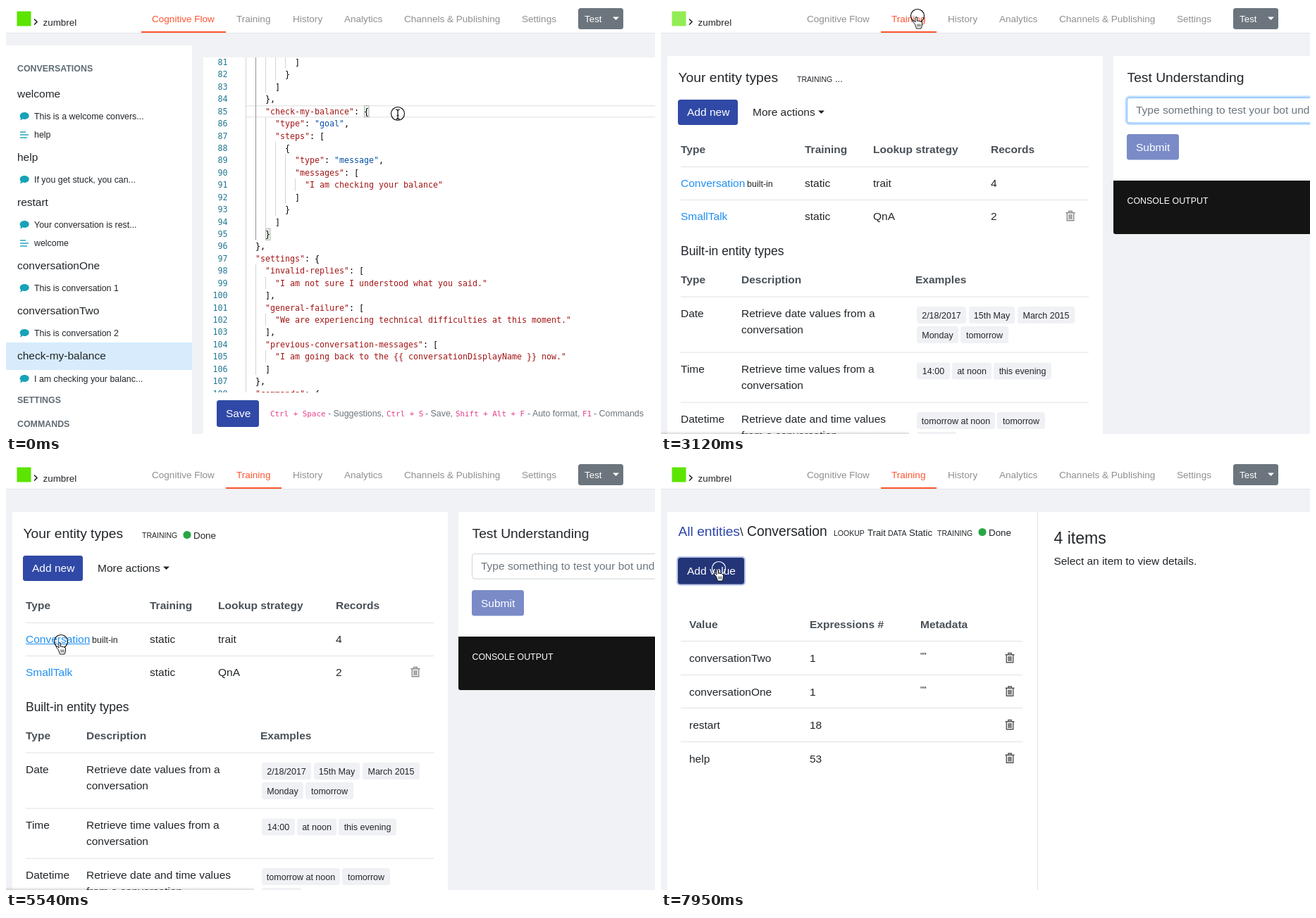
Animation of 921x608 px, one loop 8000 ms. Source, as an HTML page:

```html
<!DOCTYPE html>
<html lang="en">
<head>
<meta charset="utf-8">
<title>Bot console</title>
<style>
html, body { margin: 0; width: 100%; height: 100%; overflow: hidden; background: #f1f2f5; }
svg { display: block; width: 100vw; height: 100vh; }
text { font-family: "Liberation Sans", Arial, sans-serif; white-space: pre; }
.mono { font-family: "DejaVu Sans Mono", monospace; }
.b { font-weight: 700; }
</style>
</head>
<body>
<svg id="stage" viewBox="0 0 921 608"></svg>
<script>
const INK = '#212529', HEAD = '#495057', GRAY = '#6c757d', BLUE = '#3049a6',
      ORANGE = '#ff5430', TEAL = '#17a2b8', LINE = '#dee2e6', NAV = '#8f8f8f';

// Drawing helpers
const T = (x, y, s, size = 15.5, fill = INK, attr = '') =>
  `<text x="${x}" y="${y}" font-size="${size}" fill="${fill}" ${attr}>${s}</text>`;
const B = (x, y, s, size = 15.5, fill = HEAD) => T(x, y, s, size, fill, 'class="b"');
const R = (x, y, w, h, fill, r = 0, attr = '') =>
  `<rect x="${x}" y="${y}" width="${w}" height="${h}" rx="${r}" fill="${fill}" ${attr}/>`;
const G = (id, body, attr = '') => `<g id="${id}" ${attr}>${body}</g>`;
const rule = (x, y, w) => R(x, y, w, 1, LINE);
const button = (x, y, w, h, label, fill = BLUE, id = '') =>
  R(x, y, w, h, fill, 3.5, id && `id="${id}"`) + T(x + 13, y + h / 2 + 5.3, label, 15.5, '#fff');
const down = (x, y, fill) => `<path d="M${x} ${y}h9l-4.5 4.5z" fill="${fill}"/>`;
const trash = (x, y, fill) =>
  `<g transform="translate(${x} ${y})" fill="none" stroke="${fill}" stroke-width="1.4">
   <path d="M-6.5 -4.7H6.5M-2.2 -5.2V-7H2.2V-5.2M-4.7 -4V6.3H4.7V-4M-1.9 -2.5V4.5M0 -2.5V4.5M1.9 -2.5V4.5"/></g>`;

// Header bar
function header() {
  const items = [[327, 'Training', 'navTrain'], [207, 'Cognitive Flow', 'navFlow'], [407, 'History'],
    [480, 'Analytics'], [565, 'Channels &amp; Publishing'], [732, 'Settings']];
  return R(0, 0, 921, 38, '#fff') + R(0, 38, 921, 1, '#e3e5e8') +
    R(15.5, 7.5, 20, 21, '#5ce500', 0, 'id="logo"') +
    '<path d="M40 18.500l4 4l-4 4" fill="none" stroke="#222" stroke-width="1.6"/>' +
    T(52.5, 28, 'zumbrel', 13.4) +
    items.map(([x, s, id]) => T(x, 23.3, s, 13.55, NAV, id ? `id="${id}"` : '')).join('') +
    R(192, 36, 120, 2, ORANGE, 0, 'id="underline"') +
    R(812, 3, 64, 30, GRAY, 3.5) + T(821, 23.3, 'Test', 13.4, '#fff') + down(861, 15.5, '#fff');
}

// Flow page
function sidebar() {
  const chat = y => `<path d="M26 ${y - 5.5}c9 0 9 10 0 10q-1.500 0 -2.500 -.4q-1.500 1.600 -4 1.600q1.500 -1.300 1.600 -2.800c-3.400 -3.400 -.5 -8.400 4.900 -8.400z" fill="${TEAL}"/>`;
  const list = y => [[-4, 8], [0, 12], [4, 10]].map(([d, w]) => R(20, y + d - .7, w, 1.4, TEAL)).join('');
  const heads = [[125, 'welcome'], [215, 'help'], [279, 'restart'], [369, 'conversationOne'],
    [433, 'conversationTwo'], [497, 'check-my-balance']];
  const chats = [[156.5, 'This is a welcome convers...'], [246.5, 'If you get stuck, you can...'],
    [310.5, 'Your conversation is rest...'], [400.5, 'This is conversation 1'],
    [464.5, 'This is conversation 2'], [529.5, 'I am checking your balanc...']];
  return R(0, 56, 264, 552, '#fff') + R(0, 478, 264, 39, '#d7ebfc') +
    [[93, 'CONVERSATIONS'], [563.5, 'SETTINGS'], [597.500, 'COMMANDS']].map(([y, s]) => B(16, y, s, 12.4, '#5f6b75')).join('') +
    heads.map(([y, s]) => T(16, y + 5, s)).join('') +
    chats.map(([y, s]) => chat(y) + T(40, y + 4.5, s, 12.4)).join('') +
    [[183, 'help'], [337, 'welcome']].map(([y, s]) => list(y) + T(40, y + 4.3, s, 12.4)).join('');
}

const CODE = `          ]
        }
      ]
    },
    "check-my-balance": {
      "type": "goal",
      "steps": [
        {
          "type": "message",
          "messages": [
            "I am checking your balance"
          ]
        }
      ]
    }
  },
  "settings": {
    "invalid-replies": [
      "I am not sure I understood what you said."
    ],
    "general-failure": [
      "We are experiencing technical difficulties at this moment."
    ],
    "previous-conversation-messages": [
      "I am going back to the {{ conversationDisplayName }} now."
    ]
  },
  "commands": {`.split('\n');

function editor() {
  const left = 340, col = 7.008, row = 17.43;
  const paint = s => s.replace(/(: )?("[^"]*")/g, (m, colon = '', str) =>
    `${colon}<tspan fill="${colon ? '#0451a5' : '#a31515'}">${str}</tspan>`);
  const match = (x, y) => R(x, y, 6.5, 16.5, '#e6efe6', 0, 'stroke="#b9b9b9"');
  let out = R(341, 141, 580, 1.500, '#e9e9e9') + R(341, 157, 580, 1.500, '#e9e9e9') +
    match(508.5, 141.5) + match(368.5, 316);
  CODE.forEach((text, i) => {
    const indent = text.search(/\S/), y = 84 + i * row;
    for (let c = 0; c < indent; c += 2)
      out += R(left + Math.round(c * col), y - 13, 1, row + .1, c === 2 && i < 15 ? '#939393' : '#d3d3d3');
    out += T(314.6, y, 81 + i, 11.64, '#237893', 'class="mono" text-anchor="end"') +
      T(left + indent * col, y, paint(text.trim()), 11.64, '#000', 'class="mono"');
  });
  const keys = [[375, 'Ctrl + Space', 457, 'Suggestions,'], [540, 'Ctrl + S', 595, 'Save,'],
    [638, 'Shift + Alt + F', 740, 'Auto format,'], [818, 'F1', 834, 'Commands']];
  return R(280, 73, 641, 535, '#fff') +
    `<clipPath id="view"><rect x="280" y="73" width="641" height="476"/></clipPath><g clip-path="url(#view)">${out}</g>` +
    R(514, 141, 2, 18, '#000', 0, 'id="codeCaret"') +
    button(299, 560, 60, 38, 'Save') +
    keys.map(([x, k, x2, s]) => T(x, 583, k, 10.86, '#e83e8c', 'class="mono"') + T(x2, 583, '- ' + s, 12.4, GRAY)).join('');
}

// Training page
const done = (x, y) => `<circle cx="${x}" cy="${y - 5}" r="5.600" fill="#28a745"/>` + T(x + 9, y, 'Done', 13.4);
const columns = (y, xs, names) => names.map((s, i) => B(xs[i], y, s)).join('');
const chips = (y, list) => list.map(([x, w, s]) =>
  R(x, y - 12, w, 24, '#f0f1f4', 3.5) + T(x + w / 2, y + 4.6, s, 12.5, INK, 'text-anchor="middle"')).join('');

function builtIns() {
  const rows = [[371, 'Date', 'Retrieve date values from a', 'conversation'],
    [450, 'Time', 'Retrieve time values from a', 'conversation'],
    [521, 'Datetime', 'Retrieve date and time values', 'from a conversation'],
    [600, 'Number', 'Retrieve numeric from a', 'conversation']];
  return T(28, 283.500, 'Built-in entity types', 17.45) +
    columns(323.5, [28, 114, 361], ['Type', 'Description', 'Examples']) +
    [342, 421, 492, 571].map(y => rule(28, y, 579)).join('') +
    rows.map(([y, a, b, c]) => T(28, y, a) + T(114, y, b) + T(114, y + 23.2, c)).join('') +
    chips(368.5, [[363, 70, '2/18/2017'], [437, 65, '15th May'], [506, 81, 'March 2015']]) +
    chips(396.5, [[363, 59, 'Monday'], [425, 68, 'tomorrow']]) +
    chips(448, [[363, 47, '14:00'], [413, 56, 'at noon'], [472, 82, 'this evening']]) +
    chips(518.5, [[363, 111, 'tomorrow at noon'], [477, 68, 'tomorrow']]) +
    chips(546.5, [[363, 56, 'at noon']]) +
    chips(598, [[363, 29, '10'], [395, 35, 'five']]);
}

function training() {
  const heads = ['Type', 'Training', 'Lookup strategy', 'Records'], xs = [28, 204, 301, 468];
  const cells = (y, vals) => vals.map((s, i) => T(xs[i + 1], y, s)).join('');
  return R(9, 71, 618, 540, '#fff', 2) + T(24.5, 108, 'Your entity types', 19.25) +
    T(193, 108, 'TRAINING', 10.5) + G('dots', T(247, 108, '...', 13)) + G('done', done(257, 108.5)) +
    button(24, 133, 85, 36, 'Add new') + T(130, 156.3, 'More actions') + down(223, 148.5, INK) +
    rule(28, 228, 579) +
    G('loading', columns(209, [28, 110, 235, 450], heads) + T(28, 260.500, 'Loading entities...')) +
    G('loaded', columns(209, xs, heads) + rule(28, 275, 579) +
      T(28, 256.800, 'Conversation', 15.5, '#1e8ff0') + R(28, 258, 91, 1, '#1e8ff0', 0, 'id="linkLine"') +
      T(122, 256.800, 'built-in', 12.5) + cells(256.800, ['static', 'trait', '4']) +
      T(28, 304, 'SmallTalk', 15.5, '#1e8ff0') + cells(304, ['static', 'QnA', '2']) + trash(581, 298.5, '#8a8a8a')) +
    G('lower', builtIns()) +
    R(642, 71, 290, 180, '#fff', 2) + T(661.500, 108, 'Test Understanding', 19.25) +
    R(661.5, 130.500, 300, 35.500, '#fff', 3.5, 'stroke="#ced4da"') +
    G('glow', R(660, 129, 303, 38.500, 'none', 5, 'stroke="#bfdeff" stroke-width="3"') +
      R(661.5, 130.500, 300, 35.500, '#fff', 3.5, 'stroke="#80bdff"')) +
    T(674, 153, 'Type something to test your bot understanding', 15.5, GRAY) +
    R(674, 139, 1, 18, '#000', 0, 'id="inputCaret"') +
    button(661, 182, 74, 36.500, 'Submit', '#7a8bc8') +
    R(642, 248, 290, 76, '#141414', 3) + R(642, 248, 290, 8, '#141414') +
    T(661.500, 281, 'CONSOLE OUTPUT', 12.4, '#fff');
}

// Entity page
function entity() {
  const rows = [['conversationTwo', '1', 1], ['conversationOne', '1', 1], ['restart', '18'], ['help', '53']];
  const label = (x, s) => T(x, 104.5, s, 10.5);
  return R(9, 71, 912, 540, '#fff') + R(534, 71, 1, 537, '#e3e5e8') +
    T(24.5, 104.5, 'All entities', 19.2, '#2c45a8') + T(112, 104.5, '\\', 17) + T(122, 104.5, 'Conversation', 19.3) +
    label(245, 'LOOKUP') + T(293, 104.5, 'Trait', 13.2) + label(322, 'DATA') + T(352, 104.5, 'Static', 13.2) +
    label(392, 'TRAINING') + done(456, 104.5) +
    R(22, 134, 98, 41.500, '#b9c3e6', 5, 'id="ring"') + button(24, 136, 94, 37.500, 'Add value', BLUE, 'addValue') +
    columns(236.300, [40, 211, 368], ['Value', 'Expressions #', 'Metadata']) +
    rows.map(([a, n, meta], i) => {
      const y = 284 + i * 47.5;
      return rule(28, Math.round(y - 30), 485) + T(40, y, a) + T(211, y, n) +
        (meta ? T(368, y - 4, '""', 12) : '') + trash(495, y - 5.5, '#555');
    }).join('') +
    T(557.500, 116.300, '4 items', 23) + T(557.500, 146.300, 'Select an item to view details.', 15.4);
}

const pointer = `<circle id="halo" r="9.500" fill="none" stroke="#111" stroke-width="1.2"/>` +
  G('beam', '<path d="M-3 -6q3 0 3 2q0 -2 3 -2M0 -4V6M-3 8q3 0 3 -2q0 2 3 2M-1.500 2.500h3" fill="none" stroke="#000" stroke-width="1.2"/>') +
  G('arrow', '<path d="M-2 1V13.500L1 11L3.200 15.800L5.400 14.800L3.300 10.200H7.200Z" fill="#000" stroke="#fff" stroke-width=".8"/>') +
  G('hand', `<path d="M-3.500 12L-6.500 8.500Q-7 6.500 -5 7L-3 9V3Q-3 1.500 -1.800 1.500Q-.5 1.500 -.5 3V7.300Q1 6.300 2 7.700Q3.500 6.800 4.500 8.300Q6.500 8 6.500 10V13Q6.500 15 5 18H-1.500Z" fill="#fff" stroke="#111"/>
    <path d="M0 11.500v4M2 11.500v4M4 11.500v4" stroke="#111" stroke-width=".8"/>`);

document.getElementById('stage').innerHTML =
  `<defs><linearGradient id="fade" x2="0" y2="1"><stop stop-color="#777" stop-opacity="0"/><stop offset="1" stop-color="#777" stop-opacity=".55"/></linearGradient></defs>` +
  R(0, 0, 921, 608, '#f1f2f5') +
  G('flow', sidebar() + editor()) + G('train', training()) + G('entity', entity()) +
  header() + R(-6, 604, 358, 8, 'url(#fade)', 4, 'id="status"') + G('cursor', pointer);

// Timeline
const $ = id => document.getElementById(id);
const show = (id, on) => $(id).setAttribute('visibility', on ? 'inherit' : 'hidden');
const set = (id, name, v) => $(id).setAttribute(name, v);
const within = (t, a, b) => t >= a && t < b;
const clamp = v => Math.max(0, Math.min(1, v));
const ramp = (t, a, b) => clamp((t - a) / (b - a));
const ease = v => v * v * (3 - 2 * v);

// time, x, y, eased
const PATH = [[0, 556, 153], [1220, 556, 153], [1460, 382, 52], [1560, 368, 26], [1800, 364, 14],
  [3120, 364, 14], [3500, 364, 16], [3960, 364, 16], [4690, 78, 255, 1], [7040, 78, 255], [7480, 82, 151, 1], [8000, 82, 151]];
function place(t) {
  const i = PATH.findIndex(p => p[0] > t), [t0, x0, y0] = PATH[i - 1], [t1, x1, y1, soft] = PATH[i];
  let k = ramp(t, t0, t1);
  if (soft) k = ease(k);
  return [x0 + (x1 - x0) * k, y0 + (y1 - y0) * k];
}

function draw(t) {
  const onFlow = t < 2300, onTrain = within(t, 2300, 6600), onEntity = t >= 6600;
  show('flow', onFlow);
  show('train', onTrain);
  show('entity', onEntity);
  set('navFlow', 'fill', onFlow ? ORANGE : NAV);
  set('navTrain', 'fill', t >= 1620 ? ORANGE : NAV);
  set('underline', 'x', onFlow ? 192 : 312);
  set('underline', 'width', onFlow ? 120 : 79);
  const busy = within(t, 2300, 4970) || within(t, 5230, 6600);
  set('logo', 'opacity', busy ? .7 + .3 * Math.cos((t - 2300) / 650 * 2 * Math.PI) : 1);

  show('codeCaret', onFlow && (within(t, 480, 960) || within(t, 1440, 1980)));

  const ready = t >= 3030, trained = t >= 4790;
  show('loading', onTrain && !ready);
  show('loaded', onTrain && ready);
  set('lower', 'transform', `translate(0 ${ready ? 70.6 : 0})`);
  show('dots', onTrain && !trained);
  show('done', onTrain && trained);
  show('linkLine', onTrain && t >= 4600);
  set('glow', 'opacity', ramp(t, 2310, 2460) - ramp(t, 4790, 4940));
  show('inputCaret', onTrain && !trained && (t - 2300) % 1000 < 500);

  show('ring', onEntity && t >= 7890);
  set('addValue', 'fill', t >= 7890 ? '#233577' : t >= 7350 ? '#283d8b' : BLUE);

  show('status', within(t, 1980, 4150) || within(t, 4600, 6900));
  set('status', 'width', within(t, 6060, 6600) ? 496 : 358);

  const [x, y] = place(t);
  const kind = t < 1370 ? 'beam'
    : within(t, 1620, 4080) || within(t, 4600, 6060) || t >= 7350 ? 'hand' : 'arrow';
  for (const id of ['beam', 'arrow', 'hand']) show(id, id === kind);
  set('halo', 'stroke', t >= 7350 ? '#fff' : '#111');
  set('cursor', 'transform', `translate(${x} ${y})`);
}

const start = performance.now();
function tick() {
  draw((performance.now() - start) % 8000);
  requestAnimationFrame(tick);
}
tick();
</script>
</body>
</html>
```
